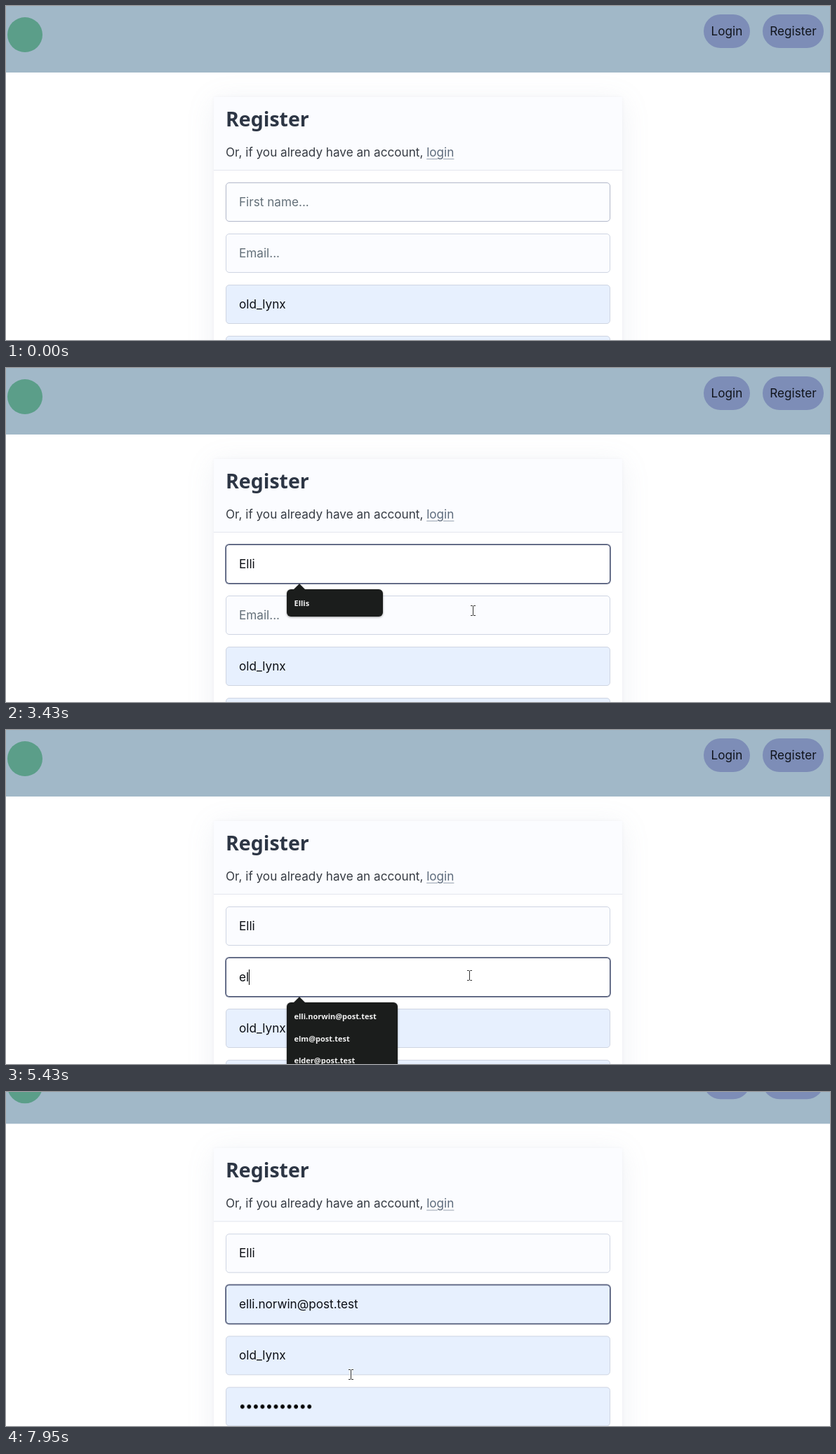
Animation of 1174 by 477 pixels, one loop 8000 ms. Source, as an HTML page:

```html
<!DOCTYPE html>
<html lang="en">
<head>
<meta charset="utf-8">
<title>Register form</title>
<style>
html, body { margin: 0; width: 100%; height: 100%; overflow: hidden; background: #fff; }
#stage { position: relative; width: 1174px; height: 477px; overflow: hidden;
  font: 17.15px/30px Inter, sans-serif; color: #373c44; white-space: pre; }
#stage div, svg { position: absolute; box-sizing: border-box; }
#page { inset: 0; }
.bar { left: 0; top: 0; width: 1174px; height: 95px; background: #a1b8c8; }
.logo { left: 2px; top: 16px; width: 50px; height: 50px; border-radius: 50%; background: #5b9e89; }
.nav { top: 12px; height: 48px; border-radius: 24px; background: #7d8db7; color: #10141c;
  line-height: 48px; text-align: center; }
.card { left: 296px; top: 130px; width: 582px; height: 560px; border-radius: 4px; background: #fff;
  box-shadow: 0 6px 40px rgba(129, 145, 181, .13), 0 0 4px rgba(129, 145, 181, .08); }
.head { left: 0; top: 0; width: 582px; height: 105px; background: #fbfcff; border-bottom: 1px solid #e3e6ee; }
.title { left: 17px; top: 13px; height: 36px; font: 700 28.5px/36px "Noto Sans", sans-serif; color: #2d3645; }
.lead { left: 17px; top: 64px; }
.lead u { color: #5d6b7c; text-decoration-color: #9aa4b2; text-underline-offset: 3px; }
.field { left: 313px; width: 548px; height: 56px; padding-left: 18px; border: 1px solid #cfd5e2;
  border-radius: 5px; display: flex; align-items: center; background: #fbfcff; color: #0c0f14; }
.field.auto { background: #e7f0fe; }
.field i { font-style: normal; color: #647079; }
.field b { width: 1px; height: 22px; margin-right: -1px; background: #000; }
.dots { width: 106px; height: 8px; background: radial-gradient(circle, #000 2.6px, transparent 3.2px) 0 0 / 9.55px 8px; }
#popup { left: 400px; border-radius: 6px; background: #1b1d1c; color: #f2f2f2; padding-top: 4px;
  box-shadow: 0 1px 3px rgba(0, 0, 0, .4); font: 600 11px/31.7px "Noto Sans", sans-serif; }
#popup::before { content: ""; position: absolute; left: 10px; top: -8px;
  border: solid transparent; border-width: 0 8px 8px; border-bottom-color: #1b1d1c; }
#popup p { margin: 0; padding-left: 10.5px; }
#popup p.on { background: #3b3d3c; }
svg { left: 0; top: 0; overflow: visible; }
</style>
</head>
<body>
<div id="stage">
  <div id="page">
    <div class="bar"></div>
    <div class="logo"></div>
    <div class="nav" style="left:994px;width:66px">Login</div>
    <div class="nav" style="left:1078px;width:87px">Register</div>
    <div class="card"><div class="head"></div><div class="title">Register</div><div class="lead">Or, if you already have an account, <u>login</u></div></div>
    <div class="field" style="top:252px"><span></span><b></b><i>First name...</i></div>
    <div class="field" style="top:325px"><span></span><b></b><i>Email...</i></div>
    <div class="field auto" style="top:398px">old_lynx</div>
    <div class="field auto" style="top:471px"><span class="dots"></span></div>
  </div>
  <div id="popup"></div>
  <svg id="cursor" width="1" height="1">
    <path id="arrow" d="M0 0V16L3.7 12.6L6.1 18L8.6 16.9L6.2 11.6H11.3Z" fill="#fff" stroke="#000" stroke-width=".9"/>
    <g id="beam" fill="none" transform="translate(.5 .5)"><path d="M-3-7H3M-3 7H3M0-7V7" stroke="#fff" stroke-width="2.6" opacity=".7"/><path d="M-3.5-7H-1L0-6.2L1-7H3.5M-3.5 7H-1L0 6.2L1 7H3.5M0-6.5V6.5" stroke="#333"/></g>
  </svg>
</div>
<script>
const $ = id => document.getElementById(id);
const fields = [...document.querySelectorAll('.field')].slice(0, 2);
const popup = $('popup');
const mail = 'elli.norwin@post.test';

// [start, value] lists; the latest entry that has started applies
const names = [[0, ''], [1570, 'E'], [2030, 'El'], [2290, 'Ell'], [2420, 'Elli']];
const mails = [[0, ''], [4880, 'e'], [5280, 'el'], [5630, 'ell'], [5830, 'elli'], [6860, mail]];
const blinks = [0, 710, 1570, 2030, 2290, 2420, 3620, 4210, 4880, 5280, 5630, 5830, 7410].map(t => [t, t]);
const focus = [[0, -1], [710, 0], [3620, 1]];
const lists = [
  [0, []],
  [770, ['Jonas Wexfield', 'people', 'Driftholme', 'remy', 'things', 'other']],
  [1570, ['Ellis', 'Elm', 'East', 'Ember']],
  [2030, ['Ellis', 'Elm', 'Elder']],
  [2420, ['Ellis']],
  [3620, []],
  [3690, ['oscar@post.test', mail], 199],
  [4210, ['oscar@post.test']],
  [4950, []],
  [5350, [mail, 'elm@post.test', 'elder@post.test'], 158],
  [5630, [mail], 158],
  [7140, []]
];
const path = [[70, 988, 330], [710, 714, 289], [3150, 714, 289], [3430, 665, 346],
  [3550, 660, 350], [6310, 660, 350], [6790, 490, 394], [7000, 491, 403], [8000, 491, 403]];

const now = (list, t) => list.findLast(e => e[0] <= t);
const ramp = (t, a, b) => Math.min(1, Math.max(0, (t - a) / (b - a)));
const mix = (a, from, to) => `color-mix(in srgb, ${to} ${a * 100}%, ${from})`;

function drawField(el, text, glow, caret, auto) {
  const [value, bar, hint] = el.children;
  value.textContent = text;
  bar.style.visibility = caret ? 'visible' : 'hidden';
  hint.style.display = text ? 'none' : '';
  el.style.borderColor = mix(glow, '#cfd5e2', '#4b5574');
  el.style.boxShadow = `0 0 0 1px ${mix(glow * glow * .7, 'transparent', '#4b5574')}`;
  el.style.background = auto ? '#e7f0fe' : mix(glow, '#fbfcff', '#fff');
}

let shown;
function drawPopup(entry, field, hover) {
  const key = entry[0] + '/' + hover;
  if (key === shown) return;
  shown = key;
  const [, rows, width = 137] = entry;
  popup.style.display = rows.length ? '' : 'none';
  popup.style.top = 316 + 73 * field + 'px';
  popup.style.width = width + 'px';
  popup.style.height = 7 + 31.7 * rows.length + 'px';
  popup.replaceChildren(...rows.map(row => {
    const p = document.createElement('p');
    p.textContent = row;
    p.className = hover ? 'on' : '';
    return p;
  }));
}

function drawCursor(t, scroll, entry, field) {
  $('cursor').style.display = t < 70 ? 'none' : '';
  if (t < 70) return;
  const i = path.findLastIndex(p => p[0] <= t);
  const [t0, x0, y0] = path[i], [t1, x1, y1] = path[i + 1] || path[i];
  const k = ramp(t, t0, t1), e = k * (2 - k);
  const x = Math.round(x0 + (x1 - x0) * e), y = Math.round(y0 + (y1 - y0) * e);
  const top = 316 + 73 * field, [, rows, width = 137] = entry;
  const onPopup = rows.length && x > 400 && x < 400 + width && y > top && y < top + 7 + 32 * rows.length;
  const row = y + scroll - 252;
  const onField = x > 313 && x < 861 && row > 0 && row % 73 < 56;
  const beam = onField && !onPopup;
  $('beam').style.display = beam ? '' : 'none';
  $('arrow').style.display = beam ? 'none' : '';
  $('cursor').style.transform = `translate(${x}px, ${y}px)`;
}

function draw() {
  const t = performance.now() % 8000;
  const active = now(focus, t)[1];
  const entry = now(lists, t);
  const preview = t >= 6860 && t < 7140;
  const lit = Math.floor((t - now(blinks, t)[1]) / 530) % 2 === 0 && !preview;
  const leave = ramp(t, 3620, 3820);
  const glow = t < 710 ? .2 * (1 - ramp(t, 70, 270)) : ramp(t, 710, 910) - leave;
  drawField(fields[0], now(names, t)[1], glow, lit && active === 0, false);
  drawField(fields[1], now(mails, t)[1], leave, lit && active === 1, t >= 6860);
  drawPopup(entry, Math.max(0, active), preview);
  const scroll = t < 7670 ? 0 : 7 + 42.5 * (t - 7670) / 280;
  $('page').style.transform = `translateY(${-scroll}px)`;
  drawCursor(t, scroll, entry, Math.max(0, active));
  requestAnimationFrame(draw);
}
draw();
</script>
</body>
</html>
```
